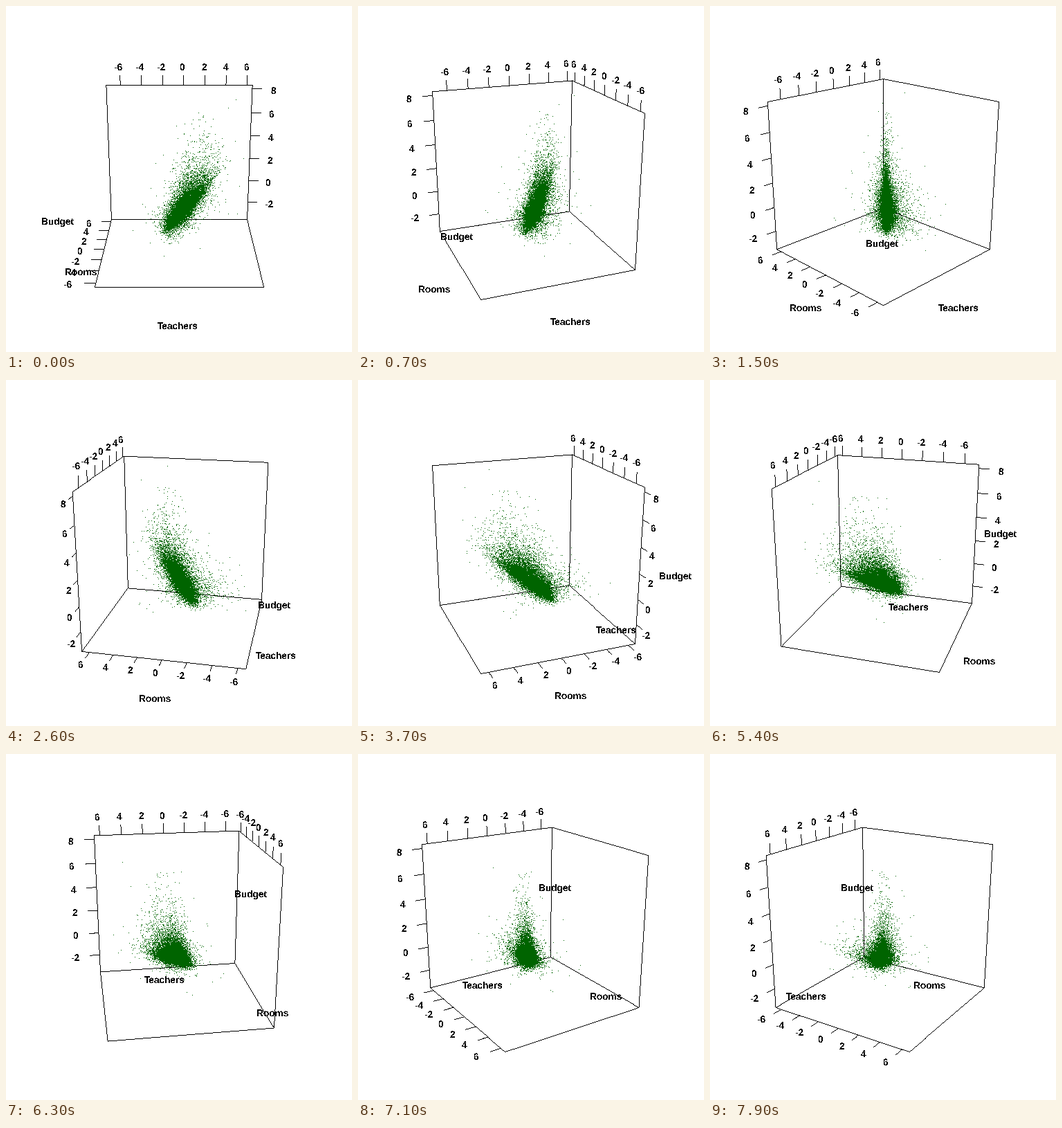
Animation of 500 by 500 pixels, one loop 8 s. Source, as a matplotlib script:

```python
import numpy as np
import matplotlib.pyplot as plt
from matplotlib.animation import FuncAnimation

plt.rcParams.update({
    "font.family": "Liberation Sans", "font.weight": "bold", "font.size": 9.8,
    "text.antialiased": False, "text.hinting": "none",
})

SIZE, FRAMES, STEP = 500, 80, 3
FOCAL, DIST = 933, 8.235
TILT = np.radians(20)
COS, SIN = np.cos(TILT), np.sin(TILT)
TICK, LABEL, TITLE = 2 / 15, 4 / 15, 1.31
EPS = 1e-6


# Data values to the cube -1..1 (x right, y up, z towards the viewer)
def teachers(v):
    return 0.1446 * v + 0.06


def rooms(v):
    return -0.1507 * v


def budget(v):
    return 0.1683 * v - 0.398


def project(p, c, s):
    x, y, z = p
    u, w = x * c + z * s, z * c - x * s
    d = DIST - w * COS - y * SIN
    return 250 + FOCAL * u / d, 250 - FOCAL * (y * COS - w * SIN) / d


def make_cloud(n=14000):
    """Correlated values: a tight core with long loose tails."""
    rng = np.random.default_rng(4)
    size = 0.38 * (rng.gamma(5, size=n) - 5)
    loose = 0.23 * np.exp(0.7 * rng.normal(size=n))
    t = size + loose * rng.normal(size=n)
    r = size + loose * rng.normal(size=n)
    r -= (rng.random(n) < 0.07) * rng.exponential(1.1, n)
    lift = 0.36 * np.exp(0.5 * rng.normal(size=n) + 0.25 * size)
    b = 0.62 * size - 0.55 + lift * rng.gamma(1.5, size=n)
    b += 0.4 * loose * rng.normal(size=n)
    keep = (np.abs(t) < 6) & (np.abs(r) < 6) & (b > -3.1) & (b < 7)
    pts = np.array([teachers(t), budget(b), rooms(r)])[:, keep]
    top = np.array([[teachers(4.55)], [budget(8.0)], [rooms(2.1)]])
    return np.hstack([pts, top])


def box_edges(c, s):
    """Edges of the floor and of the walls that face away."""
    faces = [(1, -1)]
    faces += [(0, k) for k in (-1, 1) if -k * s < -EPS]
    faces += [(2, k) for k in (-1, 1) if k * c < -EPS]
    edges = []
    for axis, side in faces:
        ring = []
        for a, b in ((-1, -1), (1, -1), (1, 1), (-1, 1)):
            p = [a, b]
            p.insert(axis, side)
            ring.append(p)
        edges += zip(ring, ring[1:] + ring[:1])
    return edges


def axis_places(c, s):
    """For each axis: a point on its edge and the direction of its ticks."""
    front_x = -np.sign(s) if abs(s) > EPS else 0
    back_z = -np.sign(c) if abs(c) > EPS else 0

    if back_z:
        t_axis = (0, 1, back_z), (0, 1, 0)
    else:
        t_axis = (0, -1, 1), (0, 0, 1)

    if not front_x:
        r_axis = (-1, -1, 0), (-1, 0, 0)
    elif abs(s) * COS < SIN:
        r_axis = (-front_x, 1, 0), (0, 1, 0)
    else:
        r_axis = (front_x, -1, 0), (front_x, 0, 0)

    if not back_z:
        b_axis = (-front_x, 0, -1), (0, 0, -1)
    else:
        side = front_x or 1
        b_axis = (side, 0, back_z), (side, 0, 0)
    return t_axis, b_axis, r_axis


def pixel_line(start, end):
    """One point per pixel along the longer direction."""
    (x0, y0), (x1, y1) = start, end
    n = int(max(abs(x1 - x0), abs(y1 - y0))) + 2
    return np.array([np.linspace(x0, x1, n), np.linspace(y0, y1, n)])


SIXES = range(-6, 7, 2)
SCALES = [(teachers, SIXES), (budget, range(-2, 9, 2)), (rooms, SIXES)]
TITLES = [("Teachers", (0, -TITLE, TITLE)),
          ("Rooms", (-TITLE, -TITLE, 0)),
          ("Budget", (-TITLE, 0, TITLE))]

fig = plt.figure(figsize=(5, 5), dpi=100, facecolor="white")
ax = fig.add_axes([0, 0, 1, 1])
ax.set_xlim(0, SIZE)
ax.set_ylim(SIZE, 0)
ax.axis("off")


def new_pixels(color, order):
    return ax.plot([], [], ",", color=color, antialiased=False, zorder=order)[0]


def new_text(label):
    return ax.text(0, 0, label, ha="center", va="baseline", zorder=3)


cloud = make_cloud()
lines = new_pixels("black", 1)
dots = new_pixels("darkgreen", 2)
tick_texts = [[new_text(str(v)) for v in values] for _, values in SCALES]
title_texts = [new_text(name) for name, _ in TITLES]


def update(i):
    turn = np.radians(STEP * i)
    c, s = np.cos(turn), np.sin(turn)
    segments = [(project(a, c, s), project(b, c, s)) for a, b in box_edges(c, s)]

    for k, (base, out) in enumerate(axis_places(c, s)):
        scale, values = SCALES[k]
        out = np.array(out, float)
        lean = out[0] * c + out[2] * s
        align = "right" if lean < -0.45 else "left" if lean > 0.45 else "center"
        for v, text in zip(values, tick_texts[k]):
            p = np.array(base, float)
            p[k] = scale(v)
            segments.append((project(p, c, s), project(p + TICK * out, c, s)))
            x, y = project(p + LABEL * out, c, s)
            text.set_position((x - 1, y + 6.5))
            text.set_ha(align)

    for (_, p), text in zip(TITLES, title_texts):
        x, y = project(p, c, s)
        text.set_position((x - 1.3, y + 6.5))

    lines.set_data(*np.hstack([pixel_line(a, b) for a, b in segments]))
    dots.set_data(*project(cloud, c, s))
    return [lines, dots, *title_texts, *sum(tick_texts, [])]


anim = FuncAnimation(fig, update, frames=FRAMES, interval=100,
                     repeat=True, repeat_delay=0)
plt.show()
```
